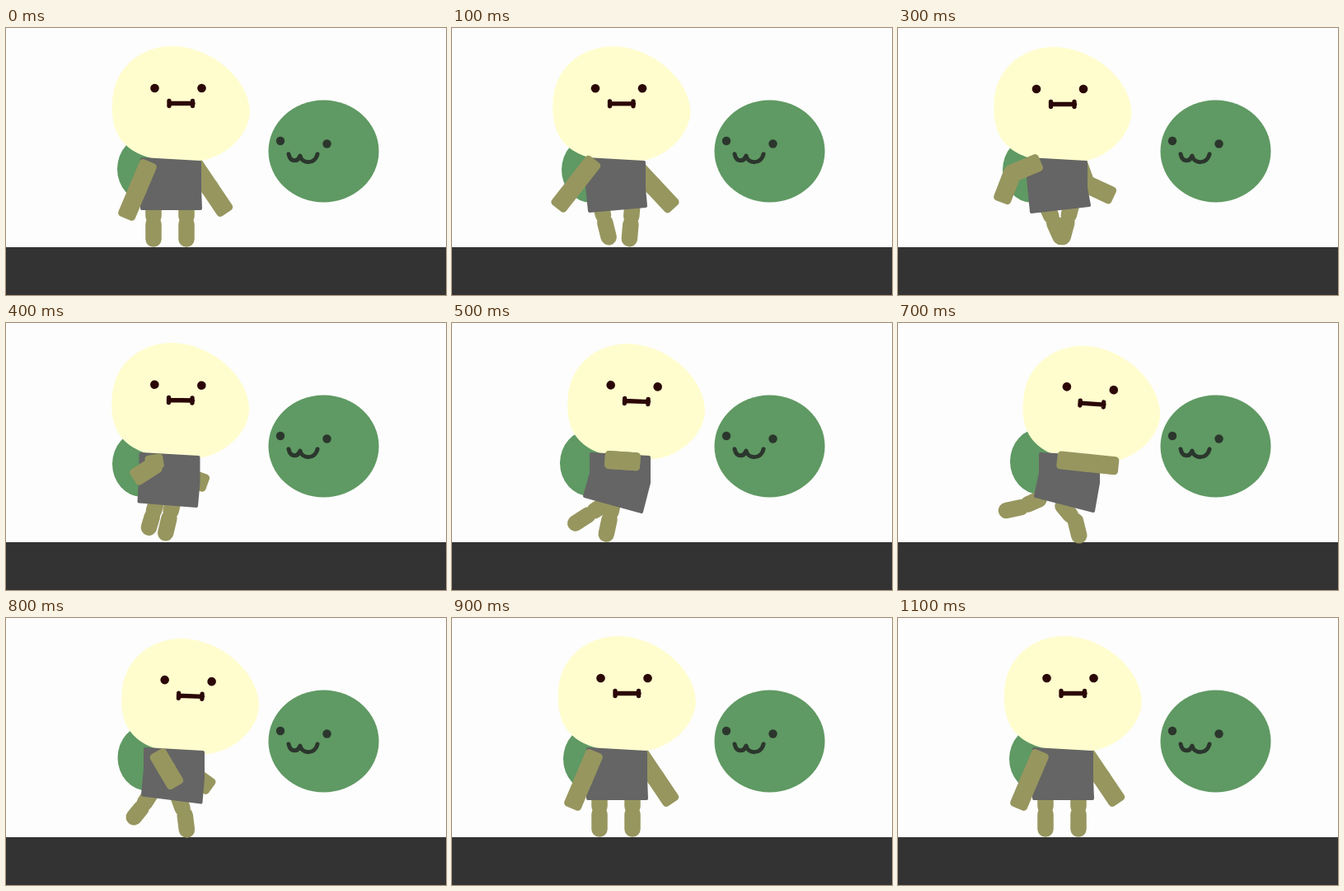
Animation, 534 px wide and 324 px high, one loop 1200 ms. Source, as an HTML page with a canvas:

```html
<!DOCTYPE html>
<html lang="en">
<head>
<meta charset="utf-8">
<title>Punch</title>
<style>
  html, body { margin: 0; width: 100%; height: 100%; overflow: hidden; background: #fdfdfd; }
  canvas { display: block; }
</style>
</head>
<body>
<canvas id="stage" width="534" height="324"></canvas>
<script>
const ctx = document.getElementById('stage').getContext('2d');
const LOOP = 1200, STEP = 100;
const SKIN = '#97965f', GREEN = '#5f9963', INK = '#2b0606', BALL_INK = '#2b362d';
const ARM = [32, 32], LEG = [24, 18];

const headShape = new Path2D('M129 92C129 52 160 22 203 22C255 24 296 66 296 102' +
  'C294 134 262 158 235 161C170 166 126 150 129 92Z');
const ballMouth = new Path2D('M343 153C345 163 354 163 357 155C359 165 375 166 378 153');
const headMouth = new Path2D('M198 91.5H227M198 88.5V94.5M226.5 88.5V94.5');

// Joints of a two-bone limb: root, middle, end. Angles in degrees.
function limb([x, y, a, b], [upper, lower]) {
  const rad = Math.PI / 180;
  const mx = x + upper * Math.cos(a * rad), my = y + upper * Math.sin(a * rad);
  return [x, y, mx, my, mx + lower * Math.cos(b * rad), my + lower * Math.sin(b * rad)];
}

// head: dx, dy, tilt; torso: top left x, then both bottom corners; limbs: x, y, two angles
function pose(time, p) {
  return {
    time,
    head: p.head,
    tail: p.tail,
    torso: p.torso,
    frontArm: limb(p.frontArm, ARM),
    backArm: limb(p.backArm, ARM),
    leftLeg: limb(p.leftLeg, LEG),
    rightLeg: limb(p.rightLeg, LEG)
  };
}

const rest = {
  head: [0, 0, 0], tail: [171, 171], torso: [163, 163, 221, 238, 221],
  frontArm: [172, 167, 113, 113], backArm: [229, 167, 56, 56],
  leftLeg: [179, 214, 90, 90], rightLeg: [219, 214, 90, 90]
};
const poses = [
  pose(0, rest),
  pose(100, {
    head: [-6.5, 0.3, 0], tail: [169, 172], torso: [161, 165, 224, 237, 218],
    frontArm: [170, 164, 128, 128], backArm: [222, 168, 47, 47],
    leftLeg: [180, 213, 76, 76], rightLeg: [219, 214, 95, 95]
  }),
  pose(300, {
    head: [-12.5, 1, 0], tail: [163, 172], torso: [156, 160, 225, 234, 217],
    frontArm: [168, 164, 157, 111], backArm: [217, 159, 70, 25],
    leftLeg: [180, 215, 66, 66], rightLeg: [211, 213, 105, 105]
  }),
  pose(500, {
    head: [11.5, 3.5, 2], tail: [167, 170], torso: [167, 159, 212, 232, 231],
    frontArm: [191, 166, 4, 184], backArm: [222, 185, 195, 15],
    leftLeg: [185, 220, 147, 147], rightLeg: [196, 215, 102, 102]
  }),
  pose(700, {
    head: [23, 6.5, 4], tail: [172, 168], torso: [171, 165, 212, 239, 230],
    frontArm: [198.5, 166.5, 6, 6], backArm: [226, 187, 195, 15],
    leftLeg: [171, 214, 156, 168], rightLeg: [200, 222, 50, 76]
  }),
  pose(900, rest),
  pose(LOOP, rest)
];

function poseAt(time) {
  const i = poses.findIndex(p => p.time > time);
  const a = poses[i - 1], b = poses[i];
  const k = (time - a.time) / (b.time - a.time);
  const mixed = {};
  for (const part in a) {
    if (part !== 'time') mixed[part] = a[part].map((v, n) => v + (b[part][n] - v) * k);
  }
  return mixed;
}

function ellipse(x, y, rx, ry, color) {
  ctx.fillStyle = color;
  ctx.beginPath();
  ctx.ellipse(x, y, rx, ry, 0, 0, 7);
  ctx.fill();
}

function stroke(path, color, width) {
  ctx.strokeStyle = color;
  ctx.lineWidth = width;
  ctx.lineCap = ctx.lineJoin = 'round';
  ctx.stroke(path);
}

function armBone(x1, y1, x2, y2) {
  ctx.save();
  ctx.translate(x1, y1);
  ctx.rotate(Math.atan2(y2 - y1, x2 - x1));
  ctx.fillStyle = SKIN;
  ctx.beginPath();
  ctx.roundRect(-5.5, -11, Math.hypot(x2 - x1, y2 - y1) + 11, 22, 4.5);
  ctx.fill();
  ctx.restore();
}

function drawArm([x, y, mx, my, ex, ey]) {
  armBone(x, y, mx, my);
  armBone(mx, my, ex, ey);
}

// The thigh stops short of the knee, leaving a slight pinch between the two bones.
function drawLeg([x, y, mx, my, ex, ey]) {
  const leg = new Path2D();
  leg.moveTo(x, y);
  leg.lineTo(x + (mx - x) * 0.6, y + (my - y) * 0.6);
  leg.moveTo(mx, my);
  leg.lineTo(ex, ey);
  stroke(leg, SKIN, 19.5);
}

function drawHead([dx, dy, tilt]) {
  ctx.save();
  ctx.translate(212 + dx, 92 + dy);
  ctx.rotate(tilt * Math.PI / 180);
  ctx.translate(-212, -92);
  ctx.fillStyle = '#fffdce';
  ctx.fill(headShape);
  ellipse(180.5, 73, 5.3, 5.3, INK);
  ellipse(237.5, 73, 5.3, 5.3, INK);
  stroke(headMouth, INK, 5.3);
  ctx.restore();
}

// The chest stays upright while the hips swing below the waist.
function drawTorso([top, lx, ly, rx, ry]) {
  const body = new Path2D();
  body.moveTo(top + 2, 159);
  body.lineTo(top + 72, 163);
  body.lineTo(top + 72, 194);
  body.lineTo(rx - 2, ry - 2);
  body.lineTo(lx + 2, ly - 2);
  body.lineTo(top + 2, 182);
  body.closePath();
  ctx.fillStyle = '#656565';
  ctx.fill(body);
  stroke(body, '#656565', 4);
}

function drawBall() {
  ellipse(385.5, 149.5, 67, 62, GREEN);
  ellipse(333, 137, 5.2, 5.2, BALL_INK);
  ellipse(389.5, 140.5, 5.2, 5.2, BALL_INK);
  stroke(ballMouth, BALL_INK, 5);
}

function draw(now) {
  const p = poseAt(Math.floor(now % LOOP / STEP) * STEP);
  ctx.fillStyle = '#fdfdfd';
  ctx.fillRect(0, 0, 534, 324);
  ctx.fillStyle = '#333';
  ctx.fillRect(0, 266, 534, 58);
  drawBall();
  ellipse(...p.tail, 36, 40, GREEN);
  drawLeg(p.leftLeg);
  drawLeg(p.rightLeg);
  drawArm(p.backArm);
  drawHead(p.head);
  drawTorso(p.torso);
  drawArm(p.frontArm);
}

const start = performance.now();
function tick() {
  draw(performance.now() - start);
  requestAnimationFrame(tick);
}
tick();
</script>
</body>
</html>
```
